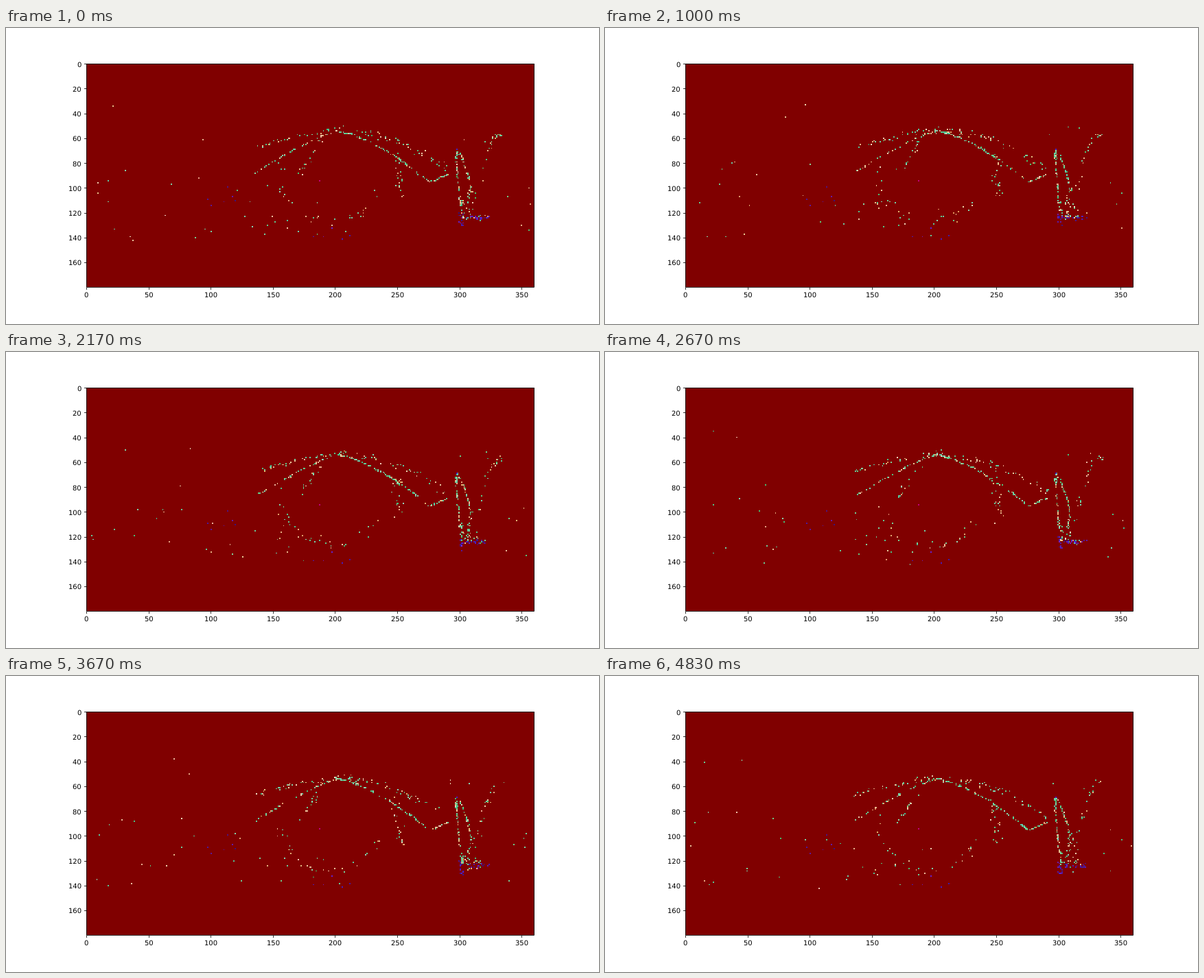
These frames come from a looping animation (864x432 px, 4990 ms). An HTML page with a canvas:

```html
<!DOCTYPE html>
<html lang="en">
<head>
<meta charset="utf-8">
<title>Event plot</title>
<style>
  html, body { margin: 0; width: 100%; height: 100%; overflow: hidden; background: #fff; }
  canvas, svg { position: absolute; left: 0; top: 0; width: 864px; height: 432px; }
  text { font: 10px "DejaVu Sans", sans-serif; text-rendering: geometricPrecision; fill: #000; }
  path { fill: none; stroke: #000; stroke-width: .8; }
</style>
</head>
<body>
<canvas id="plot" width="864" height="432"></canvas>
<svg id="axes" viewBox="0 0 864 432"></svg>
<script>
const LOOP = 4990, STEPS = 30;
const COLUMNS = 360, ROWS = 180;
const image = { left: 117, top: 51, width: 653, height: 327 };
const ctx = document.getElementById('plot').getContext('2d');
let random;

function seeded(seed) {
  return () => {
    seed = seed + 0x6D2B79F5 | 0;
    let n = Math.imul(seed ^ seed >>> 15, 1 | seed);
    n = n + Math.imul(n ^ n >>> 7, 61 | n) ^ n;
    return ((n ^ n >>> 14) >>> 0) / 4294967296;
  };
}

const around = (center, spread) => center + (random() + random() - 1) * spread;
const hsl = (hue, saturation, light) =>
  `hsl(${around(hue, 15)} ${saturation}% ${around(light, 14)}%)`;
const green = () => hsl(150, 52, 60);
const warm = () => hsl(28, 68, 74);
const violet = () => hsl(262, 72, 40);
const mixed = () => random() < .6 ? green() : warm();
const cool = () => random() < .85 ? green() : warm();

function cell(x, y, color) {
  const edgeX = n => Math.round(image.left + n * image.width / COLUMNS);
  const edgeY = n => Math.round(image.top + n * image.height / ROWS);
  x = Math.min(COLUMNS - 1, Math.round(x));
  y = Math.round(y);
  ctx.fillStyle = color;
  ctx.fillRect(edgeX(x), edgeY(y), edgeX(x + 1) - edgeX(x), edgeY(y + 1) - edgeY(y));
}

// Lights random cells along a path(t), t from 0 to 1.
function trace(count, color, spread, path) {
  for (let i = 0; i < count; i++) {
    const [x, y] = path(random());
    cell(around(x, spread), around(y, spread), color());
  }
}

// A curve leaving a peak, with the drop growing as a power of the distance.
const slope = (x, y, dx, dy, power) => t => [x + dx * t, y + dy * t ** power];

function cloud(count, color, left, top, width, height) {
  trace(count, color, 0, () => [left + random() * width, top + random() * height]);
}

function drawArch() {
  trace(38, mixed, .5, slope(202, 54, -67, 34, 1.25));
  trace(72, cool, .6, slope(200, 54, 75, 41, 1.5));
  trace(20, mixed, .6, slope(276, 95, 14, -6, 1));
  trace(34, mixed, 2.5, slope(202, 53, -67, 14, 1.3));
  trace(46, mixed, 4, slope(202, 54, 88, 31, 2));
  trace(14, mixed, 3, slope(188, 62, -18, 27, 1));
}

function drawPost() {
  trace(12, green, 1.2, slope(297, 69, 0, 8, 1));
  trace(38, mixed, .7, slope(296, 72, 4, 42, 1));
  trace(34, mixed, .7, t => [298 + 10 * Math.sin(t * Math.PI / 2), 69 + 34 * t]);
  trace(20, mixed, 3, slope(309, 100, -4, 24, 1));
  trace(14, mixed, 2, slope(301, 110, 1, 14, 1));
  trace(12, mixed, 6, slope(306, 121, 12, 3, 1));
  trace(14, violet, 2, slope(300, 120, 1, 10, 1));
  trace(20, violet, 2, slope(305, 124, 17, 0, 1));
  trace(22, mixed, 3, slope(333, 57, -22, 62, 2));
}

function drawScatter() {
  trace(26, mixed, 5, t => {
    const angle = Math.PI * (.1 + t);
    return [196 + 40 * Math.cos(angle), 92 + 35 * Math.sin(angle)];
  });
  trace(20, mixed, 6, slope(248, 72, 4, 36, 1));
  cloud(14, mixed, 4, 78, 106, 64);
  cloud(2, mixed, 15, 30, 95, 40);
  cloud(9, mixed, 112, 96, 50, 42);
  cloud(8, mixed, 150, 110, 60, 32);
  cloud(5, mixed, 335, 95, 24, 42);
  cloud(3, mixed, 290, 50, 38, 14);
}

// Cells that stay lit through the whole loop.
function drawResidue() {
  random = seeded(5);
  cloud(6, violet, 90, 98, 35, 42);
  cloud(5, violet, 180, 128, 32, 14);
  cell(187, 94, 'hsl(320 100% 38%)');
  cell(297, 69, 'hsl(250 70% 46%)');
}

function drawStep(step) {
  ctx.clearRect(0, 0, 864, 432);
  ctx.fillStyle = '#800000';
  ctx.fillRect(image.left, 52, image.width, 326);
  random = seeded(step * 7919 + 41);
  drawScatter();
  drawArch();
  drawPost();
  drawResidue();
}

function drawAxes() {
  const left = 116.64, top = 51.84, unit = 1.812, digit = 6.36;
  let lines = 'M117.5 52.5H769.5V378.5H117.5Z', labels = '';
  const label = (x, y, n) => {
    labels += `<text x="${Math.round(x)}" y="${Math.round(y)}">${n}</text>`;
  };
  const textWidth = n => String(n).length * digit;

  for (let n = 0; n < COLUMNS; n += 50) {
    const x = left + (n + .5) * unit;
    lines += `M${Math.floor(x) + .5} 378.5v3.5`;
    label(x - textWidth(n) / 2, 393, n);
  }
  for (let n = 0; n < ROWS; n += 20) {
    const y = top + (n + .5) * unit;
    lines += `M117.5 ${Math.floor(y) + .5}h-3.5`;
    label(110.2 - textWidth(n), y + 3.8, n);
  }
  document.getElementById('axes').innerHTML = `<path d="${lines}"/>${labels}`;
}

const starts = Array.from({ length: STEPS }, (_, i) => Math.round(i * 50 / 3) * 10);
let shown = -1;

function render() {
  const time = performance.now() % LOOP;
  const step = starts.filter(start => start <= time).length - 1;
  if (step !== shown) drawStep(shown = step);
  requestAnimationFrame(render);
}

drawAxes();
render();
</script>
</body>
</html>
```
